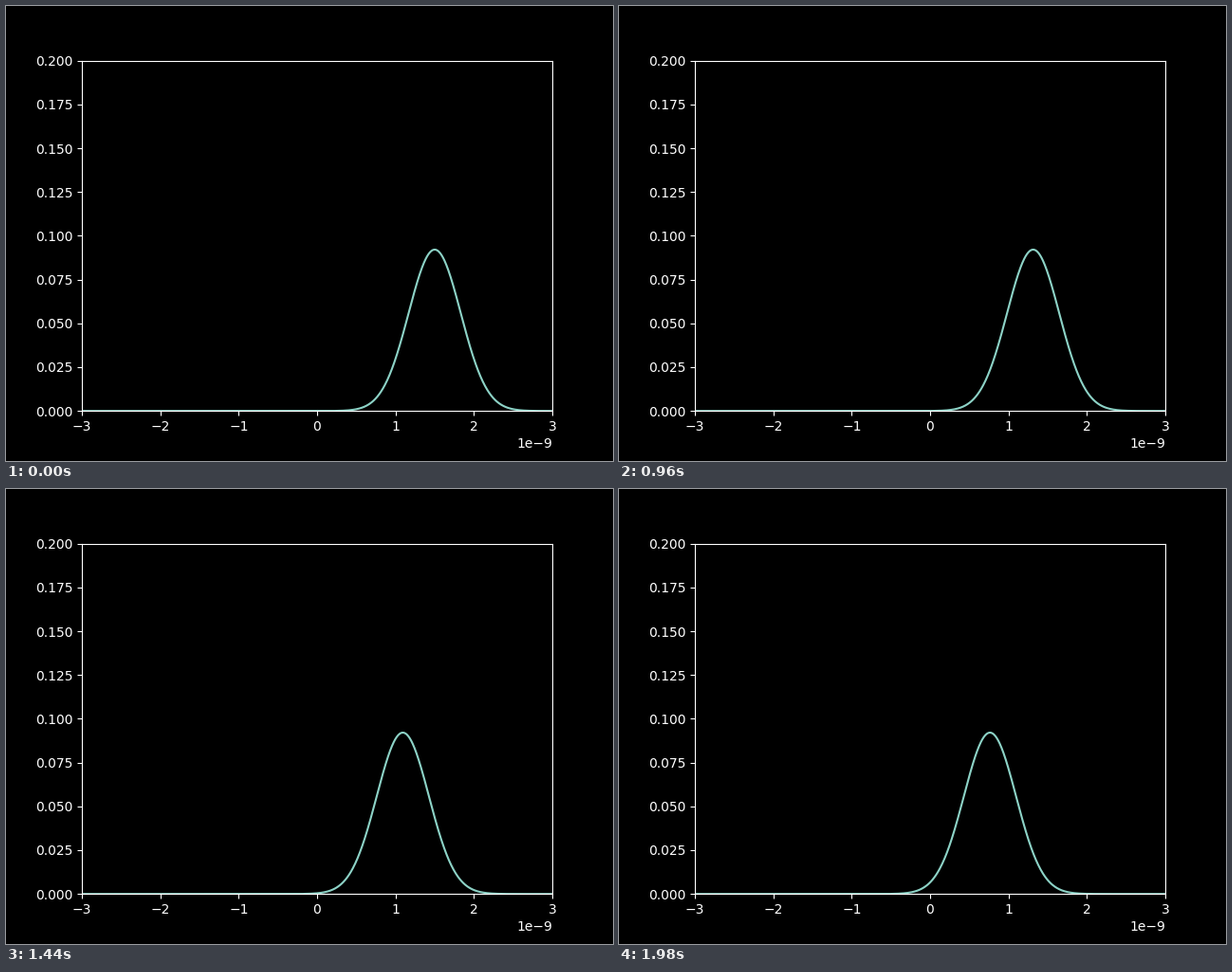
Recreate the animation shown at these times as a matplotlib script. Size 640x480 px, loop 2000 ms.

```python
import numpy as np
import matplotlib.pyplot as plt
from matplotlib.animation import FuncAnimation

FRAMES = 100
INTERVAL = 20              # ms
HBAR = 1.0546e-34          # J s
MASS = 9.109e-31           # electron, kg
PERIOD = 1.2e-14           # s
STEP = PERIOD / 600        # time per frame
OMEGA = 2 * np.pi / PERIOD
SIGMA = np.sqrt(HBAR / (2 * MASS * OMEGA))
X0 = 1.5e-9                # starting displacement, m
PEAK = 0.0921

plt.style.use("dark_background")
fig, ax = plt.subplots(figsize=(6.4, 4.8), dpi=100)
ax.set_xlim(-3e-9, 3e-9)
ax.set_ylim(0, 0.2)

x = np.linspace(-3e-9, 3e-9, 1001)
line, = ax.plot(x, np.zeros_like(x))


def density(t):
    """Coherent state swinging in a harmonic well."""
    center = X0 * np.cos(OMEGA * t)
    return PEAK * np.exp(-((x - center) / SIGMA) ** 2 / 2)


def update(frame):
    line.set_ydata(density(frame * STEP))
    return line,


anim = FuncAnimation(fig, update, frames=FRAMES, interval=INTERVAL,
                     repeat=True, repeat_delay=0)
plt.show()
```
